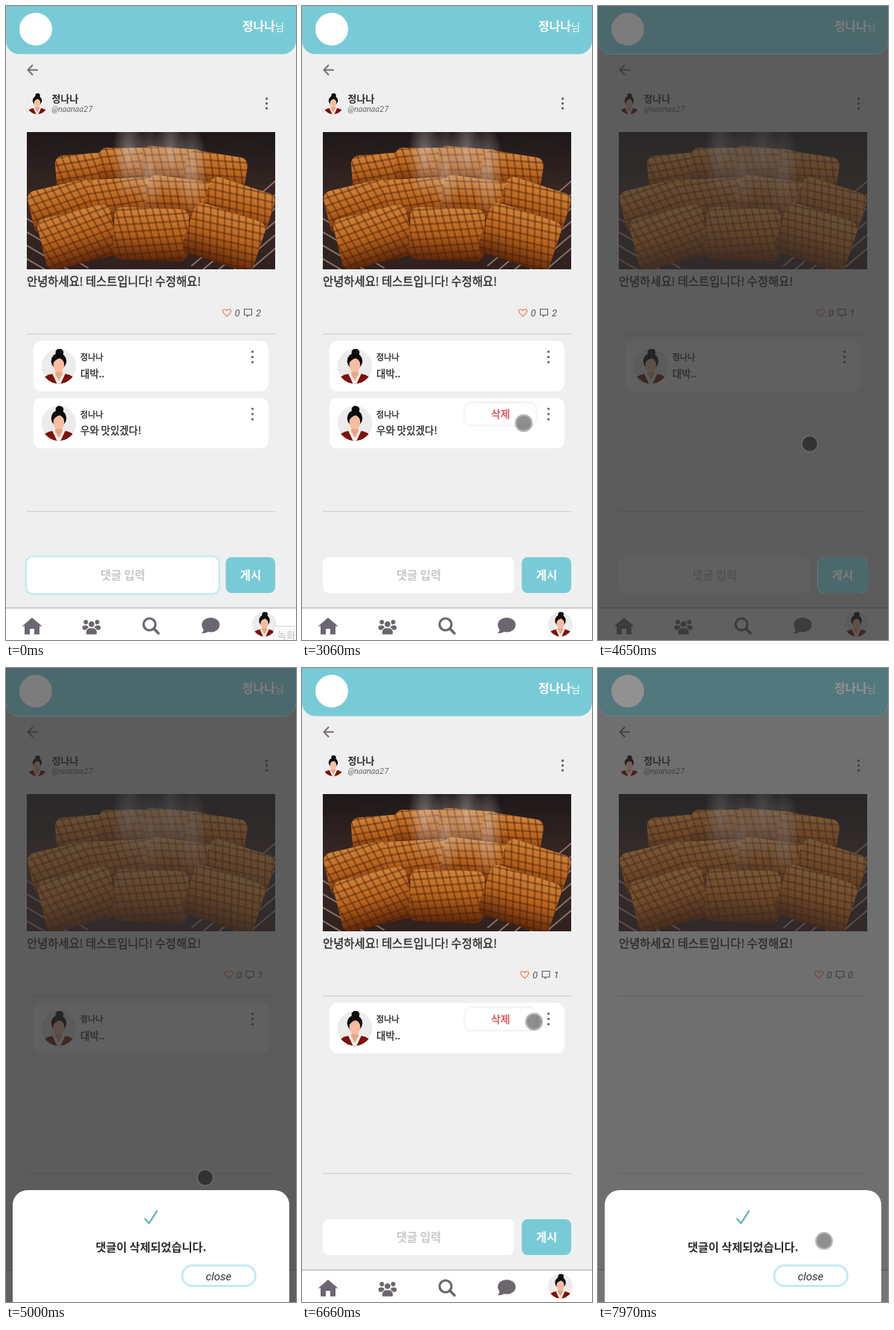
Write an HTML page with a canvas that moves like this. It is 390 px wide and 850 px high and loops after 8 s.

```html
<!DOCTYPE html>
<html lang="ko">
<head>
<meta charset="utf-8">
<style>
html, body { margin: 0; width: 100%; height: 100%; overflow: hidden; background: #efefef; }
canvas { display: block; width: 390px; height: 850px; }
</style>
</head>
<body>
<canvas id="stage"></canvas>
<script>
const LOOP = 8000, W = 390, H = 850;
const TEAL = '#78cbd6', PALE = '#c2ecf1', ICON = '#6c6670', INK = '#2c2a2b';
const KR = '"Noto Sans CJK KR", "Noto Sans CJK", sans-serif';
const USER = '정나나', HANDLE = '@naanaa27';
const FIRST_OPEN = 4640, FIRST_CLOSE = 5600, SECOND_OPEN = 7275;

const stage = document.getElementById('stage');
const g = stage.getContext('2d');
const ratio = window.devicePixelRatio || 1;
stage.width = W * ratio;
stage.height = H * ratio;

// time, x, y where the pointer turns or rests
const pointerPath = [
  [0, 404, 864], [810, 333, 646], [1400, 332, 638], [2450, 331, 548], [2700, 331, 548],
  [2920, 303, 561], [3890, 270, 549], [4440, 295, 529], [5000, 268, 683], [5480, 287, 812],
  [5610, 287, 812], [6500, 331, 471], [6900, 284, 479], [7280, 329, 485], [LOOP, 303, 780]
];

const between = (t, a, b) => t >= a && t < b;
const clamp = v => Math.max(0, Math.min(1, v));
const mix = (a, b, p) => a + (b - a) * p;

function box(x, y, w, h, r, fill) {
  g.beginPath();
  g.roundRect(x, y, w, h, r);
  if (fill) { g.fillStyle = fill; g.fill(); }
}

function oval(x, y, rx, ry, fill) {
  g.beginPath();
  g.ellipse(x, y, rx, ry, 0, 0, 7);
  g.fillStyle = fill;
  g.fill();
}

const disc = (x, y, r, fill) => oval(x, y, r, r, fill);

function ring(x, y, r, color, width) {
  g.beginPath();
  g.arc(x, y, r, 0, 7);
  g.strokeStyle = color;
  g.lineWidth = width;
  g.stroke();
}

function stroke(d, color, width) {
  g.strokeStyle = color;
  g.lineWidth = width;
  g.lineCap = g.lineJoin = 'round';
  g.stroke(new Path2D(d));
}

function shape(d, fill) {
  g.fillStyle = fill;
  g.fill(new Path2D(d));
}

function text(s, x, y, font, color, align = 'left') {
  g.font = font;
  g.fillStyle = color;
  g.textAlign = align;
  g.fillText(s, x, y);
}

const kr = (size, weight = 700) => `${weight} ${size}px ${KR}`;
const slanted = (size, family = 'Roboto') => `italic 400 ${size}px ${family}, sans-serif`;

// regular type with a hairline outline, for a medium weight
function medium(s, x, y, size, color, align) {
  text(s, x, y, kr(size, 400), color, align);
  g.strokeStyle = color;
  g.lineWidth = .35;
  g.strokeText(s, x, y);
}

function dots(x, y, gap) {
  for (let i = -1; i < 2; i++) disc(x, y + i * gap, 1.6, '#625d60');
}

function avatar(x, y, r, back) {
  g.save();
  g.translate(x, y);
  g.scale(r / 24, r / 24);
  g.beginPath();
  g.arc(0, 0, 24, 0, 7);
  g.clip();
  if (back) { g.fillStyle = back; g.fill(); }
  oval(1, -19, 5.5, 5, '#0d0a0b');
  oval(0, -7, 10.5, 11, '#0d0a0b');
  shape('M-25 25 Q-23 12 -7 10 L7 10 Q23 12 25 25Z', '#7d1009');
  shape('M-9 10 L-4 9 L0 19 L4 9 L9 10 L2 25 L-2 25Z', '#f5eee9');
  shape('M-4 3 L4 3 L5 11 L0 20 L-5 11Z', '#e9a584');
  oval(0, -1.5, 7.5, 10, '#f6bd9e');
  shape('M-9 -2 Q-9 -14 0 -14 Q9 -14 9 -2 Q7 -9 1 -11 Q-6 -9 -9 -2Z', '#0d0a0b');
  g.restore();
}

function fade(x0, y0, x1, y1, ...colors) {
  const blend = g.createLinearGradient(x0, y0, x1, y1);
  colors.forEach((c, i) => blend.addColorStop(i / (colors.length - 1), c));
  return blend;
}

function smoke(x, y, rx, ry) {
  g.save();
  g.translate(x, y);
  g.scale(rx, ry);
  const glow = g.createRadialGradient(0, 0, 0, 0, 0, 1);
  glow.addColorStop(0, 'rgba(225,215,215,.45)');
  glow.addColorStop(1, 'rgba(225,215,215,0)');
  disc(0, 0, 1, glow);
  g.restore();
}

// one grilled piece with scored lines
function piece(x, y, w, h, tilt) {
  g.save();
  g.translate(x, y);
  g.rotate(tilt);
  box(-w / 2, -h / 2, w, h, 11, fade(0, -h / 2, 0, h / 2, '#d0843a', '#b5621c', '#5e280b'));
  g.clip();
  for (let s = -w; s < w; s += 10) {
    stroke(`M${s} ${-h / 2} l${h * .3} ${h}`, 'rgba(70,25,5,.4)', 2.5);
    stroke(`M${-w / 2} ${s} l${w} ${-h * .15}`, 'rgba(70,25,5,.4)', 2.5);
  }
  g.restore();
}

function photo() {
  g.save();
  g.beginPath();
  g.rect(28, 169, 334, 184);
  g.clip();
  g.fillStyle = fade(0, 169, 0, 353, '#1d1819', '#3a2925', '#30211f');
  g.fillRect(28, 169, 334, 184);
  for (let y = 285; y < 380; y += 18) {
    stroke(`M28 ${y}l82 48M362 ${y - 50}l-112 95`, '#85736a', 2);
  }
  for (let row = 0; row < 3; row++) {
    const last = row < 2 ? 1.5 : 1;
    for (let u = -last; u <= last; u++) {
      piece(195 + u * (58 + 20 * row), 214 + 46 * row + 4 * u * u,
        82 + 9 * row, 50 + 10 * row, u * (.08 + .1 * row) + .04);
    }
  }
  for (let i = 0; i < 4; i++) smoke(165 + 28 * i, 200 + 18 * (i % 2), 22, 60);
  g.restore();
}

function header() {
  box(0, -20, W, 84.5, 18, TEAL);
  disc(40, 31, 22, '#fff');
  text('님', 374, 32.5, kr(13, 400), '#fff', 'right');
  text(USER, 362, 33, kr(16), '#fff', 'right');
}

function post(count) {
  stroke('M42 85.7H29.5M35.5 79.5L29.5 85.7L35.5 92', '#7a7074', 2);
  avatar(42, 131, 14);
  text(USER, 61.5, 128.5, kr(13), INK);
  text(HANDLE, 61.5, 142, slanted(11, 'Lato'), '#6f686b');
  dots(350.5, 130.7, 6.5);
  photo();
  medium('안녕하세요! 테스트입니다! 수정해요!', 28, 374.5, 15.4, INK);

  g.save();
  g.translate(count === 1 ? 2.5 : 0, 0);
  stroke('M297 416 L292.6 411.6 Q290.4 408.6 292.6 407 Q295 405.7 297 408.3 Q299 405.7 301.4 407 Q303.6 408.6 301.4 411.6Z', '#ee8052', 1.2);
  text('0', 307.5, 416, slanted(13), '#555');
  stroke('M320.5 406.5H330.5V414.3H326.5L324.5 416.3V414.3H320.5Z', '#69565a', 1.1);
  text(count, 336, 416, slanted(13), '#555');
  g.restore();

  g.fillStyle = '#d2d2d2';
  for (const y of [439, 677]) g.fillRect(28, y, 334, 1.3);
}

function comment(y, words) {
  box(37, y, 316, 67.5, 10, '#fff');
  avatar(71, y + 34, 23.5, '#ececec');
  medium(USER, 100, y + 26, 11.2, INK);
  medium(words, 100, y + 48.5, 13.5, INK);
  dots(331.5, y + 21.5, 7);
}

function menu(y) {
  g.save();
  g.shadowColor = 'rgba(0,0,0,.14)';
  g.shadowBlur = 4 * ratio;
  box(219.5, y + 7, 95, 29, 8, '#fff');
  g.restore();
  medium('삭제', 267, y + 26.5, 13.8, '#d8474d', 'center');
}

function form(focused) {
  if (focused) box(25.5, 736.5, 262.5, 53, 10, PALE);
  box(28, 739, 257.5, 48, 8, '#fff');
  text('댓글 입력', 157, 768.5, kr(15.4), '#c9c9c9', 'center');
  box(295.5, 739, 66.5, 48, 8, TEAL);
  text('게시', 329, 768.5, kr(15.4), '#fff', 'center');
}

function nav() {
  g.fillStyle = '#fff';
  g.fillRect(0, 807, W, 43);
  g.fillStyle = '#c9c9c9';
  g.fillRect(0, 806, W, 2);
  shape('M35 820 L48.5 831.5 H45 V842.5 H38 V835 H32 V842.5 H25 V831.5 H21.8Z', ICON);
  for (const side of [-1, 1]) {
    disc(115 + side * 7.6, 826, 3, ICON);
    box(115 + side * 8.3 - 4, 830.5, 8, 6, 3, ICON);
  }
  box(107, 833.2, 16, 10, [6, 6, 2, 2], '#fff');
  disc(115, 828.7, 4.6, '#fff');
  disc(115, 828.7, 3.8, ICON);
  box(108, 834.2, 14, 8.3, [5, 5, 1, 1], ICON);
  ring(193, 829, 8, ICON, 3.2);
  stroke('M199 835 L205 841', ICON, 3.6);
  oval(275.3, 829.7, 12, 9.8, ICON);
  shape('M266 833 Q266 838 263 841 Q269 841.5 273 838Z', ICON);
  avatar(347.5, 828.7, 16.5, '#ececec');
}

// coloured areas keep a little more light than the page
function dim(alpha) {
  const vivid = new Path2D();
  vivid.roundRect(0, -20, W, 84.5, 18);
  vivid.rect(28, 169, 334, 184);
  vivid.roundRect(295.5, 739, 66.5, 48, 8);
  const page = new Path2D(vivid);
  page.rect(0, -20, W, H + 20);
  g.fillStyle = `rgba(45,45,45,${alpha})`;
  g.fill(page, 'evenodd');
  g.fillStyle = `rgba(50,50,50,${alpha - .12})`;
  g.fill(vivid);
}

function sheet(age) {
  const p = clamp((age - 40) / 300);
  if (!p) return;
  g.save();
  g.translate(0, 150 * Math.pow(1 - p, 3));
  box(9, 700, 372, 190, 20, '#fff');
  stroke('M187 738.5 L192.3 744.5 L203 728', '#74b3bd', 2.4);
  text('댓글이 삭제되었습니다.', 195, 782, kr(15.3), INK, 'center');
  box(237, 801, 98.5, 27.5, 14);
  g.strokeStyle = PALE;
  g.lineWidth = 2.8;
  g.stroke();
  text('close', 286, 821, slanted(15), '#333', 'center');
  g.restore();
}

function pointer(t) {
  const i = pointerPath.findIndex(k => k[0] > t);
  const [t0, x0, y0] = pointerPath[i - 1], [t1, x1, y1] = pointerPath[i];
  const p = (t - t0) / (t1 - t0);
  const x = mix(x0, x1, p), y = mix(y0, y1, p);
  disc(x, y, 10, 'rgba(0,0,0,.44)');
  ring(x, y, 11, 'rgba(110,110,110,.5)', 2);
}

function hints(t) {
  const alpha = 1 - clamp((t - 60) / 350);
  if (alpha) {
    g.globalAlpha = alpha;
    g.fillStyle = '#fafafa';
    g.fillRect(360, 831.5, 30, 19);
    g.strokeStyle = '#d8d8d8';
    g.lineWidth = 1;
    g.strokeRect(360, 831.5, 40, 30);
    text('녹화', 365, 849, kr(13.3, 400), '#c2c2c2');
    g.globalAlpha = 1;
  }
  if (between(t, FIRST_CLOSE, 5880)) {
    box(0, 832, 127.5, 18, [0, 2, 0, 0], '#ffb900');
    text('안전한 연결 설정 중...', 2, 846.5, kr(12.7, 400), '#222');
  }
}

function draw(t) {
  const count = t < FIRST_OPEN ? 2 : t < SECOND_OPEN ? 1 : 0;
  g.setTransform(ratio, 0, 0, ratio, 0, 0);
  g.fillStyle = '#efefef';
  g.fillRect(0, 0, W, H);
  header();
  post(count);
  if (count > 0) comment(449, '대박..');
  if (count > 1) comment(525.5, '우와 맛있겠다!');
  if (between(t, 2985, FIRST_OPEN)) menu(525.5);
  if (between(t, 6620, SECOND_OPEN)) menu(449);
  form(t < 2520);
  nav();
  if (between(t, FIRST_OPEN, FIRST_CLOSE)) {
    dim(.755);
    sheet(t - FIRST_OPEN);
  } else if (t >= SECOND_OPEN) {
    dim(.655);
    sheet(t - SECOND_OPEN);
  }
  hints(t);
  pointer(t);
}

const start = performance.now();
function tick() {
  draw((performance.now() - start) % LOOP);
  requestAnimationFrame(tick);
}
tick();
</script>
</body>
</html>
```
